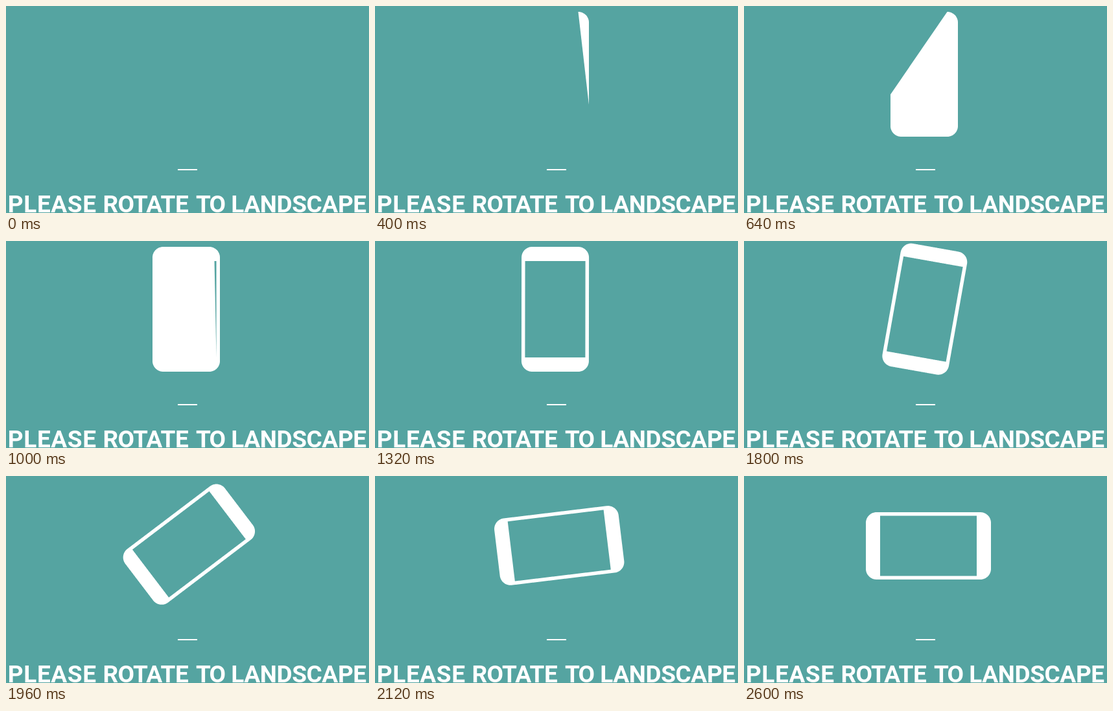
An HTML page that plays this animation: 560 px wide and 320 px high, repeating every 3.4 s.

```html
<!DOCTYPE html>
<html lang="en">
<head>
<meta charset="utf-8">
<title>Rotate to landscape</title>
<style>
  html, body { margin: 0; width: 100%; height: 100%; overflow: hidden; background: #55a4a1; }
  svg { display: block; width: 100%; height: 100%; }
  text { font: 700 37px Roboto, "Open Sans", sans-serif; }
</style>
</head>
<body>
<svg viewBox="0 0 560 320" fill="#fff">
  <defs>
    <path id="bodyPath" d="M313.5 9a16.5 16.5 0 0 1 16.5 16.5v160a16.5 16.5 0 0 1-16.5 16.5h-71a16.5 16.5 0 0 1-16.5-16.5v-160a16.5 16.5 0 0 1 16.5-16.5z"/>
    <path id="screenPath" d="M324.5 180v-149h-93v149z"/>
  </defs>
  <g id="phone">
    <polygon id="body"/>
    <polygon id="screen" fill="#55a4a1"/>
  </g>
  <rect x="265" y="252" width="30" height="2"/>
  <g>
    <text x="2.8" y="319" letter-spacing="0.6">PLEASE</text>
    <text x="149.5" y="319" letter-spacing="-0.5">ROTATE</text>
    <text x="293" y="319" letter-spacing="-2">TO</text>
    <text x="347.3" y="319" letter-spacing="-0.4">LANDSCAPE</text>
  </g>
</svg>
<script>
const LOOP = 3400, STEP = 40;
const byId = id => document.getElementById(id);
const phone = byId('phone');

const progress = (time, start, duration) =>
  Math.min(1, Math.max(0, (time - start) / duration));

// cubic-bezier(.42, 0, 1, 1), solved by bisection
function easeIn(x) {
  if (x <= 0 || x >= 1) return x;
  let low = 0, high = 1, s;
  for (let i = 0; i < 24; i++) {
    s = (low + high) / 2;
    const at = 1.26 * s * (1 - s) ** 2 + 3 * s * s * (1 - s) + s ** 3;
    if (at < x) low = s; else high = s;
  }
  return 3 * s * s - 2 * s ** 3;
}

function easeInOutExpo(x) {
  if (x <= 0 || x >= 1) return x;
  return x < .5 ? 2 ** (20 * x - 10) / 2 : 1 - 2 ** (10 - 20 * x) / 2;
}

// Returns a function that fills the first part of an outline, closed by a chord.
function trimmedShape(polygon, path) {
  const length = path.getTotalLength();
  const pointAt = distance => {
    const p = path.getPointAtLength(distance);
    return p.x.toFixed(3) + ',' + p.y.toFixed(3);
  };
  const outline = Array.from({ length: Math.ceil(length) }, (_, i) => pointAt(i));
  return amount => {
    const end = amount * length;
    const points = end > 0 ? [...outline.slice(0, Math.ceil(end)), pointAt(end)] : [];
    polygon.setAttribute('points', points.join(' '));
  };
}

const drawBody = trimmedShape(byId('body'), byId('bodyPath'));
const drawScreen = trimmedShape(byId('screen'), byId('screenPath'));

function render(now) {
  const time = Math.floor(now % LOOP / STEP) * STEP;
  drawBody(easeIn(progress(time, 34, 800)));
  drawScreen(easeIn(progress(time, 601, 800)));
  const angle = 90 * easeInOutExpo(progress(time, 1284, 1316));
  phone.setAttribute('transform', `rotate(${angle} 280 110)`);
}

const start = performance.now();
function tick() {
  render(performance.now() - start);
  requestAnimationFrame(tick);
}
tick();
</script>
</body>
</html>
```
